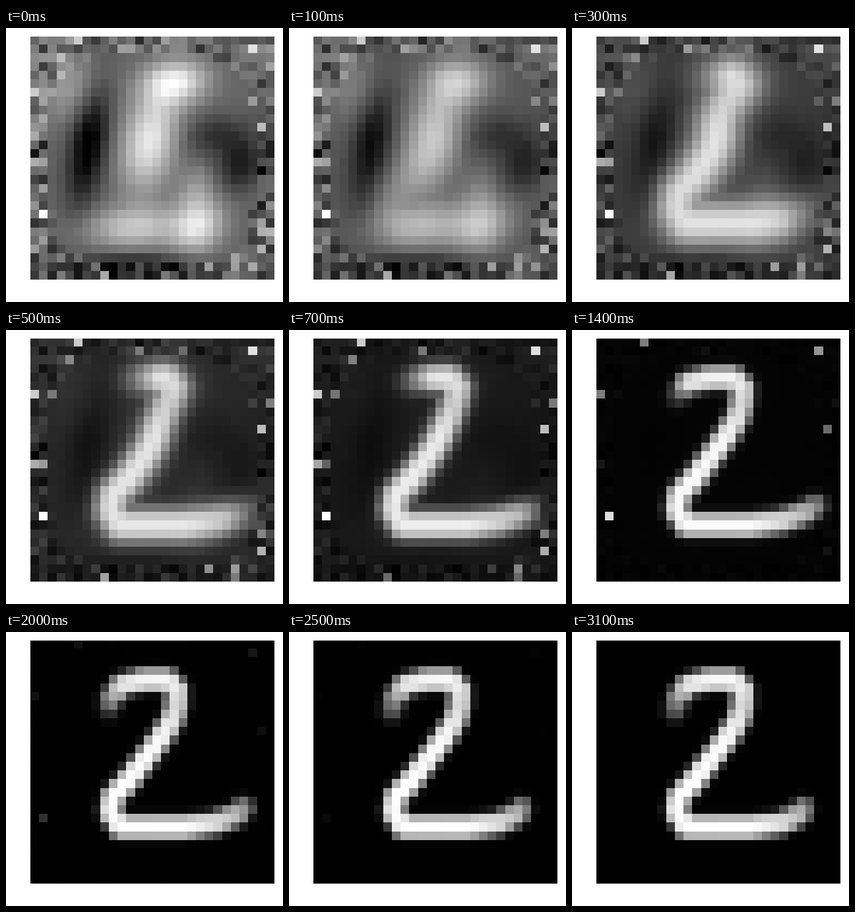
A matplotlib script that plays this animation: 420x416 px, repeating every 3200 ms.

```python
import numpy as np
import matplotlib.pyplot as plt
from matplotlib.animation import FuncAnimation

W, H, DPI = 420, 416, 100
N = 28
FRAMES, STEP = 32, 100
FORM = 300  # ms until the digit has taken over from the soft blobs

rows, cols = np.mgrid[0:N, 0:N].astype(float)

# Pen path of the digit: column, row, ink
PATH = np.array([
    (8.5, 7.6, .3), (8.8, 6.2, .56), (10, 4.7, .9), (12.4, 4.1, .96),
    (15.2, 4.1, .97), (16.3, 5.2, .9), (16.3, 6.9, .84), (15.8, 8.7, .9),
    (14.6, 10.6, .98), (10.8, 15.6, 1), (9, 17.5, 1), (8.7, 19.3, .98),
    (9.8, 21, 1), (17.2, 21, 1), (20.6, 20.6, .87), (22.8, 19.6, .72),
    (23.2, 18.8, .5)])
LAST = len(PATH) - 1
along = np.linspace(0, LAST, 240)
pen_x, pen_y, pen_ink = (np.interp(along, np.arange(LAST + 1), p)
                         for p in PATH.T)

# Soft start shape: column, row, spread x, spread y, strength
BLOBS = [
    (16.2, 4.8, 2.6, 1.8, .52), (13.2, 11.5, 2.2, 4, .53),
    (11.5, 21.5, 4, 1.7, .38), (18.8, 21.3, 2, 2.2, .46),
    (18.5, 17, 1.5, 1.8, .18), (6.2, 12, 1.5, 4.8, -.42),
    (23.6, 14.4, 1.8, 2, -.28), (21, 11, 2.8, 1.6, -.2),
    (11, 26, 5.5, 1, -.33), (4, 5.5, 2.6, 2.6, .22)]

# Brightest stray cells: column, row, brightness
HOT = [(1, 20, 1.1), (25, 1, .88), (5, 0, .8), (0, 6, .8), (26, 10, .74)]


def blob(x, y, sx, sy, a):
    dx = cols - x + .15 * (rows - y)
    return a * np.exp(-(dx / sx) ** 2 / 2 - ((rows - y) / sy) ** 2 / 2)


def fade(t, span, power=1.0):
    return np.exp(-(max(t, 0) / span) ** power)


def grow(distance, t, delay):
    """Reveal a stroke end, the far tip last."""
    return np.clip((distance + .0019 * t - delay) / 1.5, 0, 1)


rng = np.random.default_rng(12)
rim = ((cols - 13.5) / 11.7) ** 4 + ((rows - 13.7) / 12.1) ** 4 > 1
grain = rng.normal(0, 1, (N, N)) * np.where(rim, .12, .006)
soft_shape = sum(blob(*b) for b in BLOBS)

# Stray cells in the rim die out one by one
specks = [(c, r, v, 1050 + 540 * v) for c, r, v in HOT]
for r, c in rng.choice(np.argwhere(rim), 14, replace=False):
    specks.append((c, r, rng.uniform(.45, .7), rng.uniform(450, 1150)))


def stroke(t):
    past = t - FORM
    lean = 2 * fade(past, 400) * np.exp(-((pen_y - 8.5) / 3) ** 2)
    reach = 3 * max(1 - t / 2600, 0) * np.clip((along - LAST + 2) / 2, 0, 1)
    x = pen_x - lean + reach
    ink = pen_ink * (1 - .18 * fade(past, 500))
    ink = ink * grow(along, t, 3.2) * grow(LAST - along, t, 1.15)
    width = 1.36 + 1.14 * fade(past, 350)
    power = 3.8 - 1.8 * fade(past, 900)
    d = np.hypot(cols[..., None] - x, rows[..., None] - pen_y)
    return (ink * np.exp(-(d / width) ** power)).max(axis=-1)


def picture(frame):
    t = frame * STEP
    if t > 2300:  # slower steps at the end
        t -= (t - 2300) % 200
    img = (.39 * fade(t, 520, 1.2) + soft_shape * fade(t, 300)
           + grain * fade(t, 600, 1.2))
    img = np.clip(img, 0, 1)
    img += (1 - img) * min(t / FORM, 1) * stroke(t)
    for c, r, v, life in specks:
        img[r, c] = max(img[r, c], v / (1 + (t / life) ** 8))
    return np.clip(img, 0, 1)


fig = plt.figure(figsize=(W / DPI, H / DPI), dpi=DPI, facecolor="white")
ax = fig.add_axes([37 / W, 33.8 / H, 369.6 / W, 369.6 / H])
ax.axis("off")
image = ax.imshow(picture(0), cmap="gray", vmin=0, vmax=1,
                  interpolation="nearest", aspect="auto")


def update(frame):
    image.set_data(picture(frame))
    return [image]


anim = FuncAnimation(fig, update, frames=FRAMES, interval=STEP,
                     repeat=True, repeat_delay=0)
plt.show()
```
